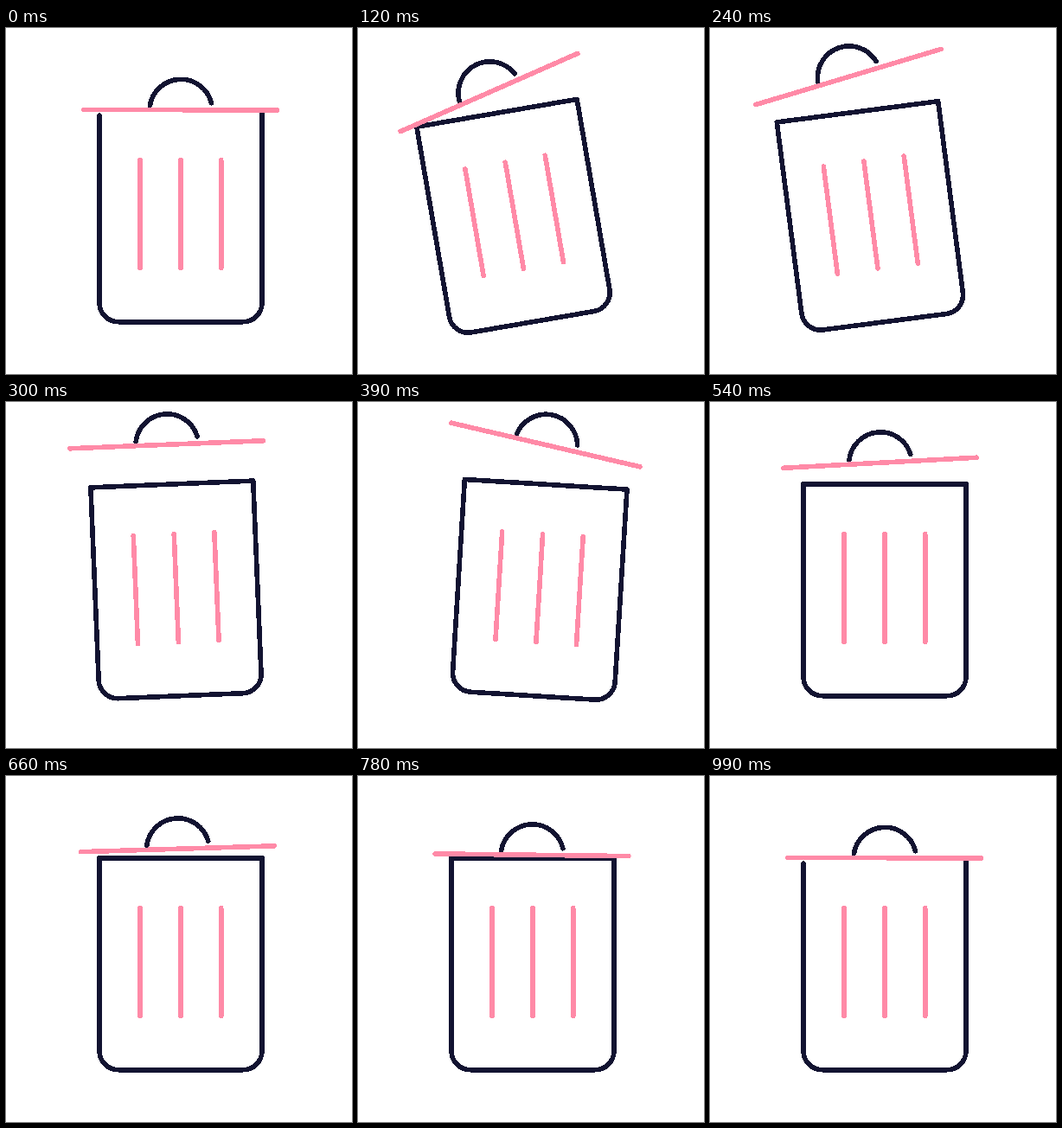
An HTML page that plays this animation: 400 px wide and 400 px high, repeating every 6520 ms.

```html
<!DOCTYPE html>
<html lang="en">
<head>
<meta charset="utf-8">
<title>Trash can</title>
<style>
  html, body { margin: 0; width: 100%; height: 100%; overflow: hidden; background: #fff; }
  svg { display: block; width: 100%; height: 100%; }
  path {
    fill: none; stroke-width: 5.6; stroke-linecap: round; stroke-linejoin: round;
    shape-rendering: crispEdges;
  }
  .ink { stroke: #121331; }
  .pink { stroke: #ff8aa7; }
</style>
</head>
<body>
<svg viewBox="0 0 400 400">
  <g id="can">
    <path id="body" class="ink"/>
    <path class="pink" d="M155 152.5V277.5M202 152.5V277.5M248.7 152.5V277.5"/>
    <g id="lid">
      <path class="ink" d="M-35.4 -4.8A36.4 36.4 0 0 1 35.8 -8"/>
      <path class="pink" d="M-111.8 0H111.8"/>
    </g>
  </g>
</svg>
<script>
const LOOP = 6520, STEP = 30, END = 990;
const WALLS = "V318A22 22 0 0 0 130 339.7H274A22 22 0 0 0 296 318V";
const CLOSED = `M108 94.8${WALLS}94.8Z`;
// With the lid shut, the sides stop just below it.
const OPEN = `M108 101${WALLS}99`;

const easeOut = (p, power) => 1 - (1 - p) ** power;
const easeInOut = p => (1 - Math.cos(Math.PI * p)) / 2;

// A sharp kick from rest to the first turning point, then gentle swings between the others.
function swing(t, rest, ...turns) {
  let from = 0, value = rest;
  for (const [to, next] of turns) {
    if (t < to) {
      const p = (t - from) / (to - from);
      return value + (next - value) * (from ? easeInOut(p) : easeOut(p, 3));
    }
    from = to;
    value = next;
  }
  return value;
}

// Height of the lid above the can: a hop that settles softly.
function hop(t) {
  const peak = 355, height = 47.5;
  if (t >= END) return 0;
  return height * (t < peak ? easeOut(t / peak, 1.8) : Math.exp(-(((t - peak) / 237) ** 1.65)));
}

const [can, body, lid] = ["can", "body", "lid"].map(id => document.getElementById(id));

function draw(time) {
  const t = Math.floor((time % LOOP) / STEP) * STEP;
  const tilt = swing(t, 0, [170, -10], [415, 3.9], [540, 0]);
  const turn = swing(t, 0.2, [170, -14.4], [400, 9.65], [560, -3.6], [780, 0.7], [END, 0.2]);
  const drift = swing(t, 0, [220, -5], [390, -2.7], [530, -5.2], [860, 0]);

  body.setAttribute("d", t === 0 || t >= END ? OPEN : CLOSED);
  can.setAttribute("transform", `rotate(${tilt} 202 340)`);
  lid.setAttribute("transform", `translate(${201.7 + drift} ${94.7 - hop(t)}) rotate(${turn})`);
}

const start = performance.now();
function tick() {
  draw(performance.now() - start);
  requestAnimationFrame(tick);
}
tick();
</script>
</body>
</html>
```
